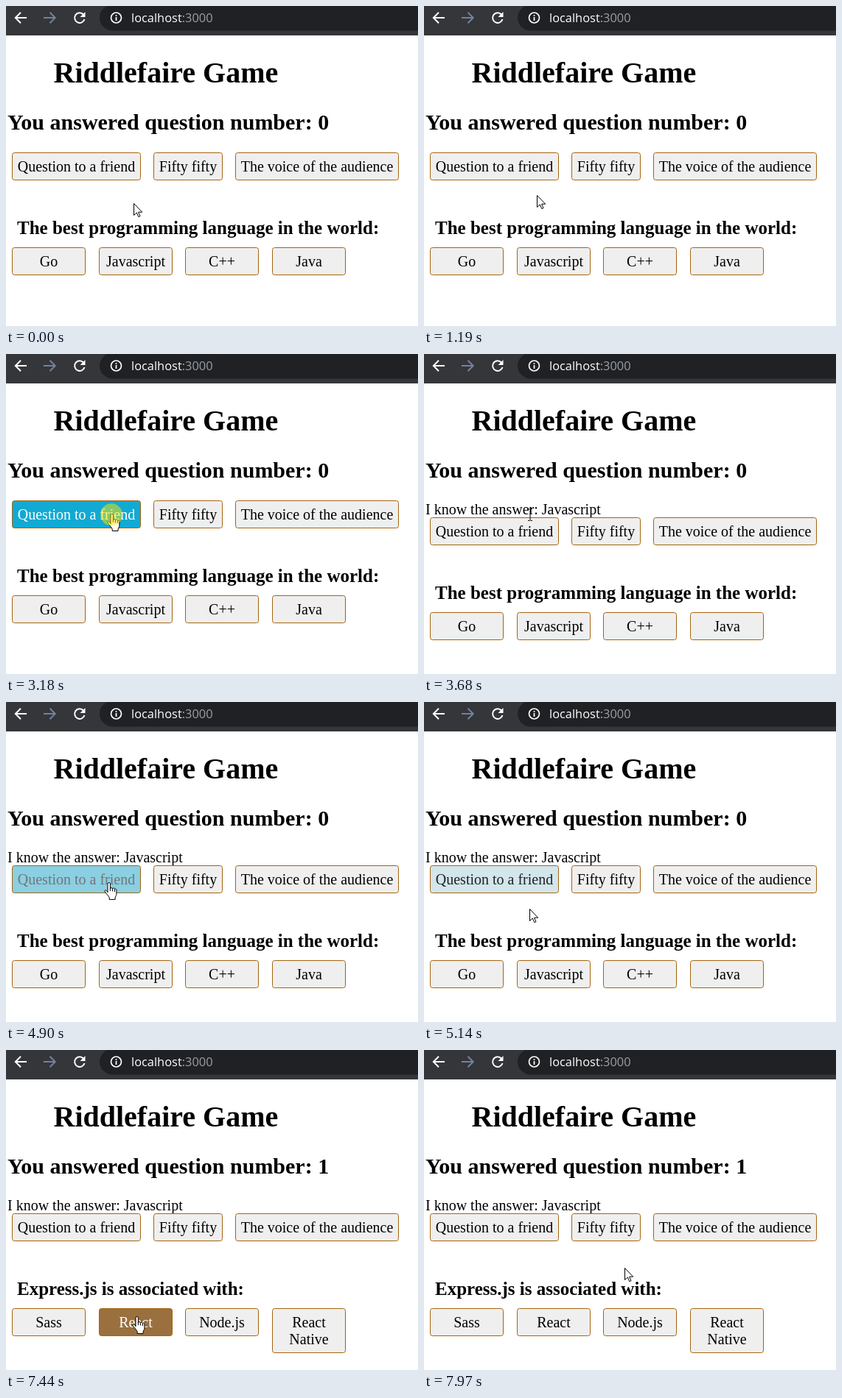
An HTML page for the animation above (7.99 s loop, 559x435 px).

```html
<!DOCTYPE html>
<html lang="en">
<head>
<meta charset="utf-8">
<title>Quiz</title>
<style>
  html, body { margin: 0; width: 100%; height: 100%; overflow: hidden; background: #fff; }
  svg { display: block; }
  text { font: 20px "Liberation Serif", "Times New Roman", serif; }
  .bold { font-weight: bold; }
  .mid { text-anchor: middle; }
  .url { font: 16.4px "Open Sans", "Noto Sans", sans-serif; fill: #fff; }
  .icon { fill: none; stroke: #fff; stroke-width: 2; }
  .button rect { fill: #efefef; stroke: #a5640f; }
  .cursor { fill: #fff; stroke: #000; stroke-linejoin: round; }
</style>
</head>
<body>
<svg width="559" height="435" viewBox="0 0 559 435">
  <rect width="559" height="40" fill="#35363a"/>
  <rect x="127" y="-1.5" width="460" height="35" rx="17.5" fill="#202124"/>
  <path class="icon" d="M28 16H13M20 8.8L12.8 16L20 23.2"/>
  <path class="icon" d="M51 16H66M59.5 8.8L66.7 16L59.5 23.2" style="stroke:#72829e"/>
  <path class="icon" d="M105 11.5A6.800 6.800 0 1 0 106.500 18"/>
  <path d="M107.500 8V15H100.500Z" fill="#fff"/>
  <circle class="icon" cx="149.500" cy="16" r="7" style="stroke-width:1.700"/>
  <path class="icon" d="M149.500 15V20M149.500 12V13.800" style="stroke-width:1.700"/>
  <text class="url" x="170" y="22">localhost<tspan fill="#9aa0a6">:3000</tspan></text>

  <text class="bold" x="64.500" y="104" style="font-size:40px">Riddlefaire Game</text>
  <text class="bold" id="count" x="2" y="168" style="font-size:30px"></text>
  <text id="hint" x="2" y="218">I know the answer: Javascript</text>
  <g id="panel">
    <text class="bold" id="question" x="15" y="310" style="font-size:25px"></text>
  </g>

  <g id="pointer">
    <path class="cursor" id="arrow" d="M.5 .5V16.500L4.300 13L6.800 18.600L9 17.700L6.600 12.200H11.700Z"/>
    <g id="hand" transform="translate(-6 -1)">
      <path class="cursor" d="M5 13.800V2.200a1.700 1.700 0 0 1 3.400 0V8.500a1.600 1.600 0 0 1 3 .3a1.600 1.600 0 0 1 3 .7a1.500 1.500 0 0 1 2.500 1.300V16c0 2-1.500 3.500-1.800 5v2.500H7.200V21C6.500 19 3 15.500 1.200 12.800C.3 11 2.200 10 3.400 11.400Z"/>
      <path class="cursor" d="M8.400 8V12M11.400 9V12.500M14.400 10V13" style="fill:none"/>
    </g>
    <path id="beam" d="M-2 -7.500H0.500M1.500 -7.500H4M1 -7V8M-2 8.500H0.500M1.500 8.500H4" fill="none" stroke="#000"/>
  </g>
  <circle id="press" r="15" fill="#ffe600" fill-opacity=".5"/>
</svg>
<script>
const LOOP = 7990, FADE = 300;
const HINT_AT = 3260, NEXT_AT = 6590, HOVER_UPDATE = 3370;
const $ = id => document.getElementById(id);
const panel = $('panel');

// time, x, y of the pointer's hot spot
const path = [
  [0, 173, 268], [600, 173, 268], [1390, 146, 253], [1420, 146, 253],
  [1650, 142, 237], [2259, 142, 237], [2580, 142.5, 218], [4790, 142.5, 219],
  [4900, 139, 246], [5200, 144, 290], [5500, 177, 363], [7440, 177, 363],
  [7970, 272, 296], [LOOP, 272, 296]
];
const rounds = [
  { question: 'The best programming language in the world:', answers: ['Go', 'Javascript', 'C++', 'Java'] },
  { question: 'Express.js is associated with:', answers: ['Sass', 'React', 'Node.js', 'React Native'] }
];

function make(tag, attrs, parent) {
  const el = document.createElementNS('http://www.w3.org/2000/svg', tag);
  for (const key in attrs) el.setAttribute(key, attrs[key]);
  return parent.appendChild(el);
}

const mix = (a, b, k) => `rgb(${a.map((v, i) => Math.round(v + (b[i] - v) * k))})`;

function makeButton(x, y, width, label) {
  const group = make('g', { class: 'button' }, panel);
  const box = make('rect', { x: x + .5, y: y + .5, width: width - 1, height: 37, rx: 3 }, group);
  const center = x + width / 2;
  const lines = [26, 49].map(dy => make('text', { class: 'mid', x: center, y: y + dy }, group));
  const button = {
    setLabel(first, second = '') {
      lines[0].textContent = first;
      lines[1].textContent = second;
      box.setAttribute('height', second ? 60 : 37);
    },
    tint(color, amount) {
      box.style.fill = mix([239, 239, 239], color, amount);
      group.style.fill = mix([0, 0, 0], [255, 255, 255], amount);
    }
  };
  button.setLabel(label);
  return button;
}

const friend = makeButton(8, 199, 175, 'Question to a friend');
makeButton(200, 199, 94, 'Fifty fifty');
makeButton(311, 199, 222, 'The voice of the audience');
const answers = [8, 126, 243, 361].map(x => makeButton(x, 328, 100, ''));

// CSS "ease": solve the bezier for x, then read y
function ease(x) {
  if (x <= 0) return 0;
  if (x >= 1) return 1;
  const bezier = (s, a, b) => 3 * (1 - s) * s * ((1 - s) * a + s * b) + s ** 3;
  let lo = 0, hi = 1;
  for (let i = 0; i < 20; i++) {
    const s = (lo + hi) / 2;
    if (bezier(s, .25, .25) < x) lo = s; else hi = s;
  }
  return bezier(lo, .1, 1);
}

// Hover strength for a pointer that enters and leaves at the given times
function hover(t, enter, leave) {
  if (t < leave) return ease((t - enter) / FADE);
  const peak = ease((leave - enter) / FADE);
  return peak * (1 - ease((t - leave) / (FADE * peak)));
}

function position(t) {
  const i = path.findIndex(p => p[0] > t);
  const [t0, x0, y0] = path[i - 1], [t1, x1, y1] = path[i];
  const k = (t - t0) / (t1 - t0);
  return [x0 + (x1 - x0) * k, y0 + (y1 - y0) * k];
}

function cursorKind(t, y) {
  const top = t < HOVER_UPDATE ? 199 : 222;
  const within = (from, height) => y >= top + from && y < top + from + height;
  if (within(0, 38) || within(129, 38)) return 'hand';
  if (within(87, 29) || y < top) return 'beam';
  return 'arrow';
}

const show = (id, on) => { $(id).style.display = on ? '' : 'none'; };

let shown = -1;
function setRound(n) {
  if (n === shown) return;
  shown = n;
  $('count').textContent = 'You answered question number: ' + n;
  $('question').textContent = rounds[n].question;
  answers.forEach((button, i) => button.setLabel(...rounds[n].answers[i].split(' ')));
}

function render(t) {
  setRound(t < NEXT_AT ? 0 : 1);
  show('hint', t >= HINT_AT);
  panel.setAttribute('transform', `translate(0 ${t < HINT_AT ? 0 : 23})`);

  friend.tint([18, 170, 210], hover(t, 2265, HOVER_UPDATE) + hover(t, 4819, 4995));
  answers[1].tint([154, 112, 62], hover(t, 5450, 7535));

  const [x, y] = position(t), kind = cursorKind(t, y);
  $('pointer').setAttribute('transform', `translate(${Math.round(x)} ${Math.round(y)})`);
  for (const id of ['arrow', 'hand', 'beam']) show(id, id === kind);

  show('press', (t >= 3180 && t < 3290) || (t >= 6510 && t < 6620));
  $('press').setAttribute('cx', x + .5);
  $('press').setAttribute('cy', y);
}

const start = performance.now();
function tick() {
  render((performance.now() - start) % LOOP);
  requestAnimationFrame(tick);
}
tick();
</script>
</body>
</html>
```
